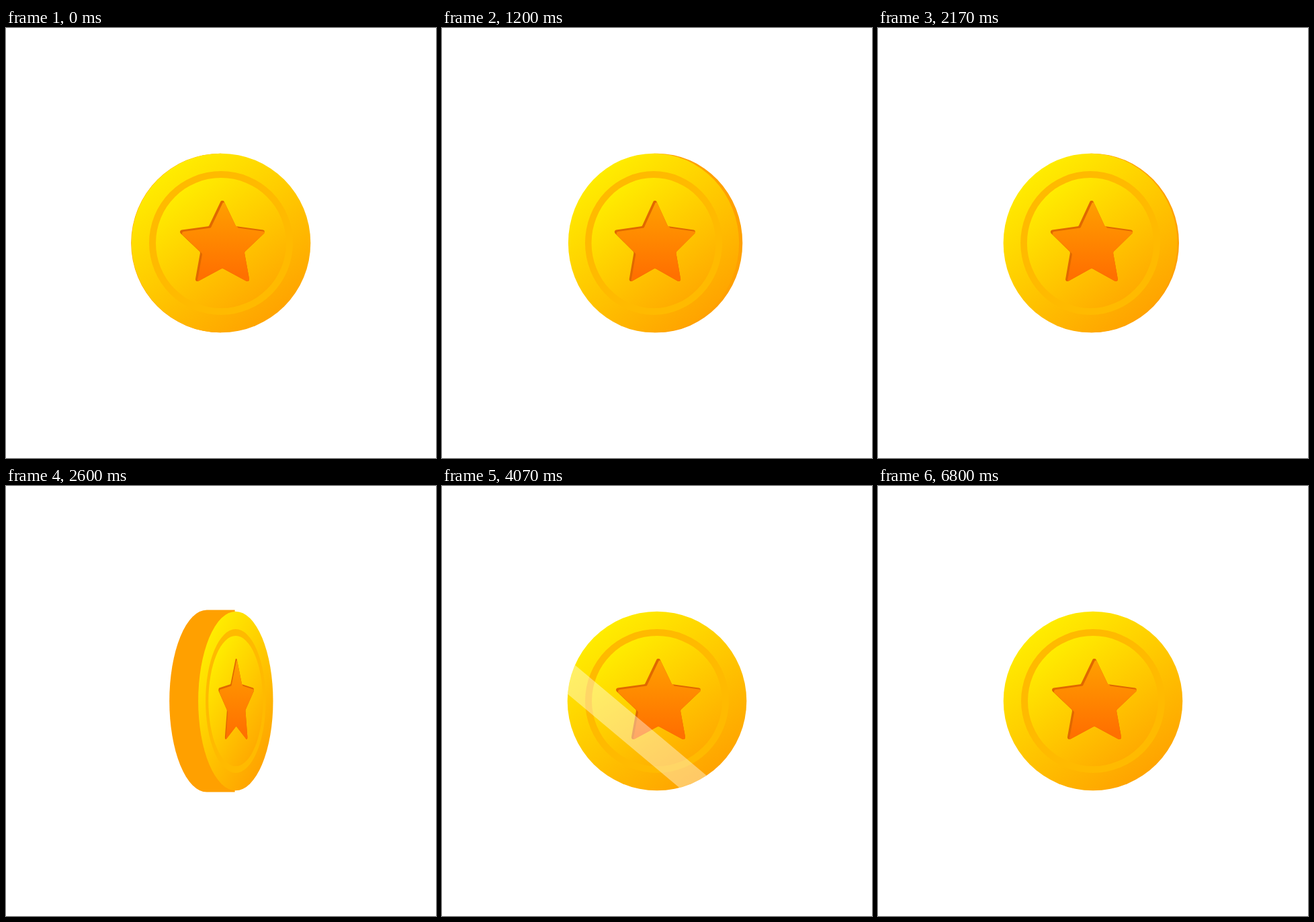
Recreate the animation shown at these times as an HTML page with a canvas. Size 640 px wide and 640 px high, loop 7.21 s.

```html
<!DOCTYPE html>
<html>
<head>
<meta charset="utf-8">
<title>Spinning coin</title>
<style>
html, body { margin: 0; height: 100%; overflow: hidden; background: #fff; }
canvas { display: block; }
</style>
</head>
<body>
<canvas id="stage" width="640" height="640"></canvas>
<script>
const ctx = document.getElementById('stage').getContext('2d');
const LOOP = 7210, TAU = Math.PI * 2, R = 133.3;

// spin keys: time (s), angle (deg), speed (deg/s)
const SPIN = [[0, 0, 0], [.77, 81.4, 178], [1.67, 253.7, 190], [2.17, 346, 183], [3, 493, 155], [3.53, 540, 0]];

const clamp = x => Math.min(1, Math.max(0, x));
const smooth = x => (x = clamp(x), x * x * (3 - 2 * x));

function spinAngle(s) {
  const i = SPIN.findIndex(k => k[0] > s);
  if (i < 0) return 540;
  const [t0, a0, v0] = SPIN[i - 1], [t1, a1, v1] = SPIN[i];
  const d = t1 - t0, u = (s - t0) / d, w = 1 - u;
  return a0 * w * w * (1 + 2 * u) + a1 * u * u * (3 - 2 * u) + d * u * w * (v0 * w - v1 * u);
}

function gradient(x0, y0, x1, y1, from, to) {
  const g = ctx.createLinearGradient(x0, y0, x1, y1);
  g.addColorStop(0, from);
  g.addColorStop(1, to);
  return g;
}

function starPath(cx, cy, outer, inner, round) {
  const p = new Path2D();
  const at = i => {
    const a = i * Math.PI / 5, r = i % 2 ? inner : outer;
    return [cx + r * Math.sin(a), cy - r * Math.cos(a)];
  };
  const [a, b] = [at(0), at(1)];
  p.moveTo((a[0] + b[0]) / 2, (a[1] + b[1]) / 2);
  for (let i = 1; i <= 10; i++) p.arcTo(...at(i), ...at(i + 1), round);
  p.closePath();
  return p;
}

const rimFill = gradient(-78, -108, 82, 112, '#ffec00', '#ffa200');
const dishFill = gradient(-58, -80, 60, 88, '#ffec00', '#ffa800');
const starFill = gradient(0, -62, 0, 48, '#ffa000', '#ff7000');
const star = starPath(2, 3, 70, 34.5, 3);
const starTop = starPath(5, 5.5, 70, 34.5, 3);

function disc(r, fill) {
  ctx.beginPath();
  ctx.arc(0, 0, r, 0, TAU);
  ctx.fillStyle = fill;
  ctx.fill();
}

function face(x, k) {
  ctx.save();
  ctx.translate(x, 320);
  ctx.scale(k, 1);
  disc(R, rimFill);
  disc(107, '#ffba00');
  disc(97, dishFill);
  ctx.fillStyle = '#e06800';
  ctx.fill(star);
  ctx.clip(star);
  ctx.fillStyle = starFill;
  ctx.fill(starTop);
  ctx.restore();
}

// side wall: half ellipse at the back, joined straight to the face
function wall(faceX, backX, k, ry) {
  const left = backX < faceX;
  ctx.beginPath();
  ctx.ellipse(backX, 320, R * k, ry, 0, -Math.PI / 2, Math.PI / 2, left);
  const joint = left ? faceX - 2 * (1 - k) : faceX + 13 * (1 - k);
  ctx.lineTo(joint, 320 + ry);
  ctx.lineTo(joint, 320 - ry);
  ctx.fillStyle = '#ffa000';
  ctx.fill();
}

function coin(t) {
  const deg = spinAngle(t / 1000) % 180;
  const sin = Math.sin(deg * Math.PI / 180);
  const k = Math.max(.004, Math.abs(Math.cos(deg * Math.PI / 180)));
  let x = 320;
  if (t < 3530) {
    if (deg < 90) {
      x += 24 * sin;
      wall(x, x - 47 * sin - .5 * k, k, R + 2.4 * sin);
    } else {
      const phi = 180 - deg;
      x -= (16.5 + 7.5 * (phi / 90) ** 3) * sin;
      wall(x, x + 47 * smooth((phi - 6) / 56), k, R + 2.2 * smooth((phi - 45) / 45));
    }
  }
  face(x, k);
}

function shine(t) {
  const u = (t - 3800) / 867;
  if (u <= 0 || u >= 1) return;
  ctx.save();
  ctx.translate(320, 320);
  ctx.beginPath();
  ctx.arc(0, 0, R, 0, TAU);
  ctx.clip();
  ctx.rotate(-50 * Math.PI / 180);
  ctx.fillStyle = 'rgba(255,255,255,.4)';
  ctx.fillRect(-R - 40 + (2 * R + 40) * u, -R, 40, 2 * R);
  ctx.restore();
}

function sparkle(x, y, size, u) {
  if (u <= 0 || u >= 1) return;
  const grow = 1 - (1 - clamp(u / .8)) ** 4;
  const shrink = 1 - clamp((u - .8) / .2) ** 2;
  const turn = u < .5 ? 2 * u * u : 1 - 2 * (1 - u) ** 2;
  const r = size * grow * shrink, c = r * .15;
  ctx.save();
  ctx.translate(x, y);
  ctx.rotate(turn * Math.PI / 2);
  ctx.beginPath();
  ctx.moveTo(0, -r);
  ctx.quadraticCurveTo(c, -c, r, 0);
  ctx.quadraticCurveTo(c, c, 0, r);
  ctx.quadraticCurveTo(-c, c, -r, 0);
  ctx.quadraticCurveTo(-c, -c, 0, -r);
  ctx.fillStyle = '#ffe100';
  ctx.fill();
  ctx.restore();
}

function draw() {
  const t = performance.now() % LOOP;
  ctx.fillStyle = '#fff';
  ctx.fillRect(0, 0, 640, 640);
  coin(t);
  shine(t);
  sparkle(470.7, 208.8, 20.3, (t - 4815) / 1000);
  sparkle(160.5, 380.5, 17.8, (t - 5800) / 1000);
  requestAnimationFrame(draw);
}
draw();
</script>
</body>
</html>
```
